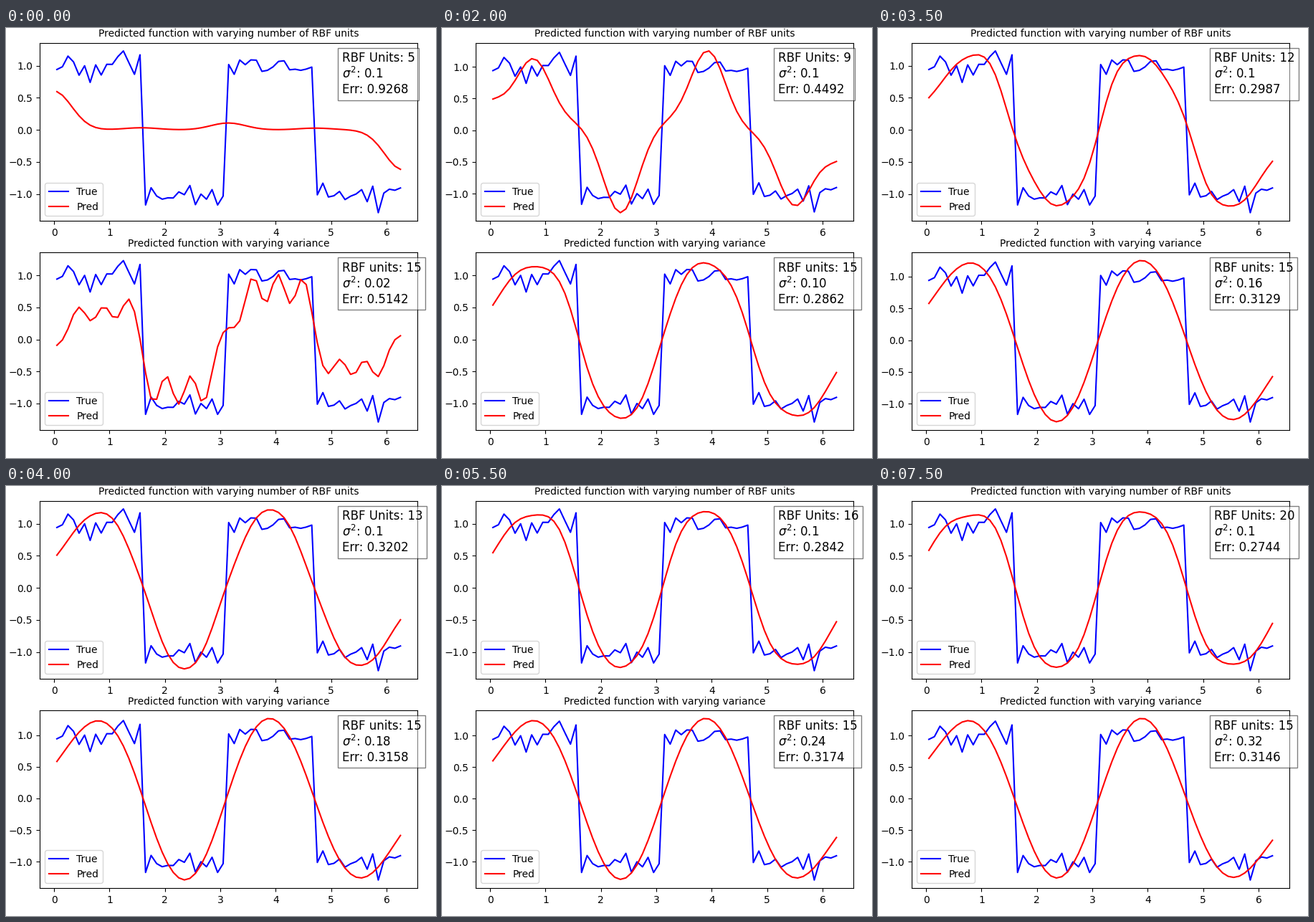
Write a matplotlib script that moves like this. It is 600x600 px and loops after 8000 ms.

```python
import numpy as np
import matplotlib.pyplot as plt
from matplotlib.animation import FuncAnimation

plt.rcParams.update({"font.family": "DejaVu Sans", "font.size": 10})

EPOCHS, RATE = 40, 0.01

# Noisy square wave; the three strongest outliers are set by hand
x = 0.05 + 0.1 * np.arange(63)
noise = np.random.default_rng(4).normal(0, 0.09, x.size).clip(-0.17, 0.17)
noise[[6, 12, 58]] = -0.26, 0.23, -0.29
true = np.sign(np.sin(2 * x)) + noise


def train(units, var):
    """Output of an RBF network after a short gradient descent."""
    centres = np.linspace(0, 2 * np.pi, units)
    phi = np.exp(-(x[:, None] - centres) ** 2 / (2 * var))
    w = -1.1 * np.cos(centres / 2)
    for _ in range(EPOCHS):
        w += RATE * phi.T @ (true - phi @ w)
    return phi @ w


fig = plt.figure(figsize=(6, 6), dpi=100)


def panel(bottom, top, title):
    ax = fig.add_axes([47.05 / 600, bottom / 600, 527.3 / 600, (top - bottom) / 600])
    ax.set_title(title, fontsize=10)
    ax.plot(x, true, "b", label="True")
    pred, = ax.plot(x, true, "r", label="Pred")
    ax.legend(loc="lower left")
    note = ax.text(0.8, 0.95, "", transform=ax.transAxes, fontsize=12, va="top",
                   bbox=dict(facecolor="white", alpha=0.5))
    return ax, pred, note


upper = panel(331.0, 579.25, "Predicted function with varying number of RBF units")
lower = panel(38.9, 286.7, "Predicted function with varying variance")


def show(parts, label, units, var, digits):
    ax, pred, note = parts
    y = train(units, var)
    pred.set_ydata(y)
    ax.relim()
    ax.autoscale_view()
    err = np.mean(np.abs(true - y))
    note.set_text(f"{label}: {units}\n$\\sigma^2$: {var:.{digits}f}\nErr: {err:.4f}")


def update(i):
    show(upper, "RBF Units", 5 + i, 0.1, 1)
    show(lower, "RBF units", 15, 0.02 * (i + 1), 2)


anim = FuncAnimation(fig, update, frames=16, interval=500, init_func=lambda: update(0),
                     repeat=True, repeat_delay=0, blit=False)
plt.show()
```
